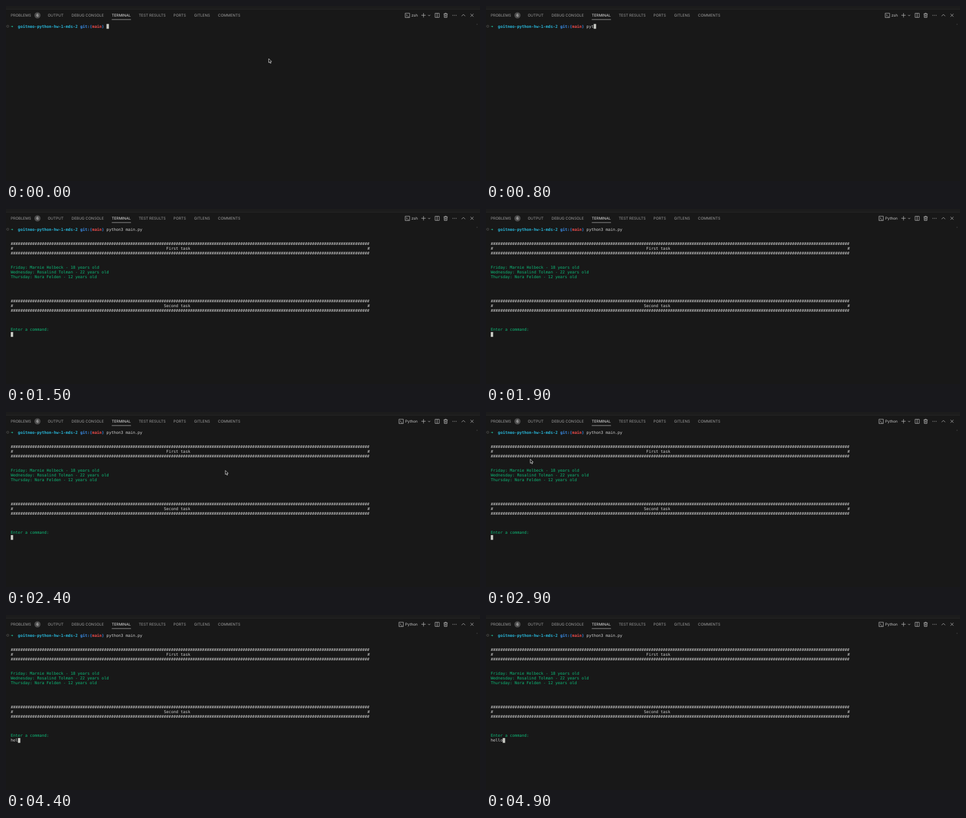
An HTML page for the animation above (5 s loop, 800 px wide and 296 px high).

```html
<!DOCTYPE html>
<html lang="en">
<head>
<meta charset="utf-8">
<title>Terminal session</title>
<style>
  html, body { margin: 0; width: 100%; height: 100%; overflow: hidden; background: #181818; }
  svg { display: block; width: 800px; height: 296px; }
  text { white-space: pre; text-rendering: geometricPrecision; }
  .ui { font: 6.35px Inter, "Open Sans", sans-serif; fill: #9d9d9d; }
  .term { font: 6.71px "DejaVu Sans Mono", monospace; fill: #d2d2d2; }
  .bold { font-weight: bold; }
  .icon { fill: none; stroke: #c5c5c5; stroke-width: .75; }
</style>
</head>
<body>
<svg viewBox="0 0 800 296">
  <rect width="800" height="5" fill="#1c1c1c"/>
  <rect y="5" width="800" height=".7" fill="#2b2b2b"/>

  <g id="tabs" class="ui"></g>
  <rect x="178.5" y="22.6" width="32.5" height=".7" fill="#c8c8c8"/>
  <circle cx="53.1" cy="15.8" r="5.2" fill="#4d4d4d"/>
  <text class="ui" x="53.1" y="18.1" text-anchor="middle" style="fill:#f0f0f0">6</text>

  <g id="shell">
    <path class="icon" d="M.4 12.2h7.4v7.4H.4zM2 14l1.8 1.8L2 17.6M4.2 18h2"/>
    <text id="shellName" class="ui" x="10.9" y="18.2" style="fill:#cccccc"></text>
  </g>
  <g class="icon">
    <path d="M701 15.7h7.4M704.7 12v7.4M712.4 15l1.8 1.8 1.8-1.8"/>
    <path d="M724.2 12.3h7v7h-7zM727.7 12.3v7"/>
    <path d="M738.6 13.3h6.8M740.8 13.3v-1.1h2.4v1.1M739.4 13.3l.4 6.2h4.4l.4-6.2M741.2 14.8v3.2M742.8 14.8v3.2"/>
    <path d="M769 17.2l3-3 3 3M784 13.2l5 5M789 13.2l-5 5"/>
  </g>
  <g fill="#c5c5c5">
    <circle cx="754.2" cy="15.8" r=".65"/>
    <circle cx="757" cy="15.8" r=".65"/>
    <circle cx="759.8" cy="15.8" r=".65"/>
  </g>
  <rect x="794.3" y="30.5" width="1.5" height="1" fill="#555"/>
  <circle cx="3" cy="34.3" r="1.8" fill="none" stroke="#6a6a6a" stroke-width=".6"/>

  <g id="prompt" class="term bold"></g>
  <text id="command" class="term"></text>
  <g id="output" class="term"></g>
  <text id="answer" class="term"></text>
  <rect id="caret" width="4.1" height="8.1" fill="#c6c8c2"/>
  <path id="pointer" d="M0 0v6.9l1.6-1.4 1.1 2.5 1.2-.5-1.1-2.5h2.1z"
        fill="#0a0a0a" stroke="#e8e8e8" stroke-width=".75" stroke-linejoin="round"/>
</svg>
<script>
const LOOP = 5000, CELL = 4.04, ROW = 8.08;
const $ = id => document.getElementById(id);
const colX = col => 8 + col * CELL;
const rowY = row => 36.6 + row * ROW;

function place(el, col, row) {
  el.setAttribute("x", colX(col));
  el.setAttribute("y", rowY(row));
}

function addText(parent, text, x, y, fill) {
  const el = document.createElementNS("http://www.w3.org/2000/svg", "text");
  el.setAttribute("x", x);
  el.setAttribute("y", y);
  if (fill) el.style.fill = fill;
  el.textContent = text;
  $(parent).append(el);
}

const write = (parent, text, col, row, fill) =>
  addText(parent, text, colX(col), rowY(row), fill);

[["PROBLEMS", 8], ["OUTPUT", 70.5], ["DEBUG CONSOLE", 110.6], ["TERMINAL", 178.4],
 ["TEST RESULTS", 224], ["PORTS", 282.6], ["GITLENS", 317.5], ["COMMENTS", 357.8]]
  .forEach(([name, x]) => addText("tabs", name, x, 18.2, name === "TERMINAL" ? "#e7e7e7" : ""));

const GREEN = "#0dbc79", BLUE = "#3b8eea";
write("prompt", "➜", 0, 0, "#23d1a8");
write("prompt", "goitneo-python-hw-1-mds-2", 3, 0, "#29b8db");
write("prompt", "git:(", 29, 0, BLUE);
write("prompt", "main", 34, 0, "#f14c4c");
write("prompt", ")", 38, 0, BLUE);

function banner(title, col, row) {
  const rule = "#".repeat(150);
  write("output", rule, 0, row);
  write("output", "#", 0, row + 1);
  write("output", title, col, row + 1);
  write("output", "#", 149, row + 1);
  write("output", rule, 0, row + 2);
}
banner("First task", 65, 3);
["Friday: Marnie Holbeck - 18 years old",
 "Wednesday: Rosalind Tolman - 22 years old",
 "Thursday: Nora Felden - 12 years old"]
  .forEach((line, i) => write("output", line, 0, 8 + i, GREEN));
banner("Second task", 64, 15);
write("output", "Enter a command:", 0, 21, GREEN);

place($("command"), 40, 0);
place($("answer"), 0, 22);

// Pointer path: time, x, y
const path = [[0, 443.4, 89], [500, 436, 93], [2399, 436, 93],
              [2400, 370.2, 98.8], [2900, 74.8, 79.8], [3500, 95.2, 206.2], [LOOP, 95.2, 206.2]];

function pointerAt(t) {
  const i = path.findIndex(p => p[0] > t);
  const [t0, x0, y0] = path[i - 1], [t1, x1, y1] = path[i];
  const k = (t - t0) / (t1 - t0), e = k * k * (3 - 2 * k);
  return [x0 + (x1 - x0) * e, y0 + (y1 - y0) * e];
}

const keyTimes = [3900, 4100, 4400, 4600, 4800];
const show = (el, on) => el.setAttribute("visibility", on ? "visible" : "hidden");

function draw(now) {
  const t = Math.floor(now % LOOP / 100) * 100;
  const typed = Math.max(0, Math.min(15, (t - 700) / 100 * 3));
  const keys = keyTimes.filter(k => k <= t).length;
  const python = t >= 1700;

  $("command").textContent = "python3 main.py".slice(0, typed);
  $("answer").textContent = "hello".slice(0, keys);
  show($("output"), t >= 1500);

  $("shell").setAttribute("transform", `translate(${python ? 662.8 : 673.4} 0)`);
  $("shellName").textContent = python ? "Python" : "zsh";

  const [col, row] = t < 1400 ? [40 + typed, 0] : t < 1500 ? [0, 1] : [keys, 22];
  $("caret").setAttribute("x", colX(col));
  $("caret").setAttribute("y", rowY(row) - 6.2);

  show($("pointer"), t < 800 || t >= 2400 && t < 3900);
  $("pointer").setAttribute("transform", `translate(${pointerAt(t)})`);
}

const start = performance.now();
function tick() {
  draw(performance.now() - start);
  requestAnimationFrame(tick);
}
tick();
</script>
</body>
</html>
```
